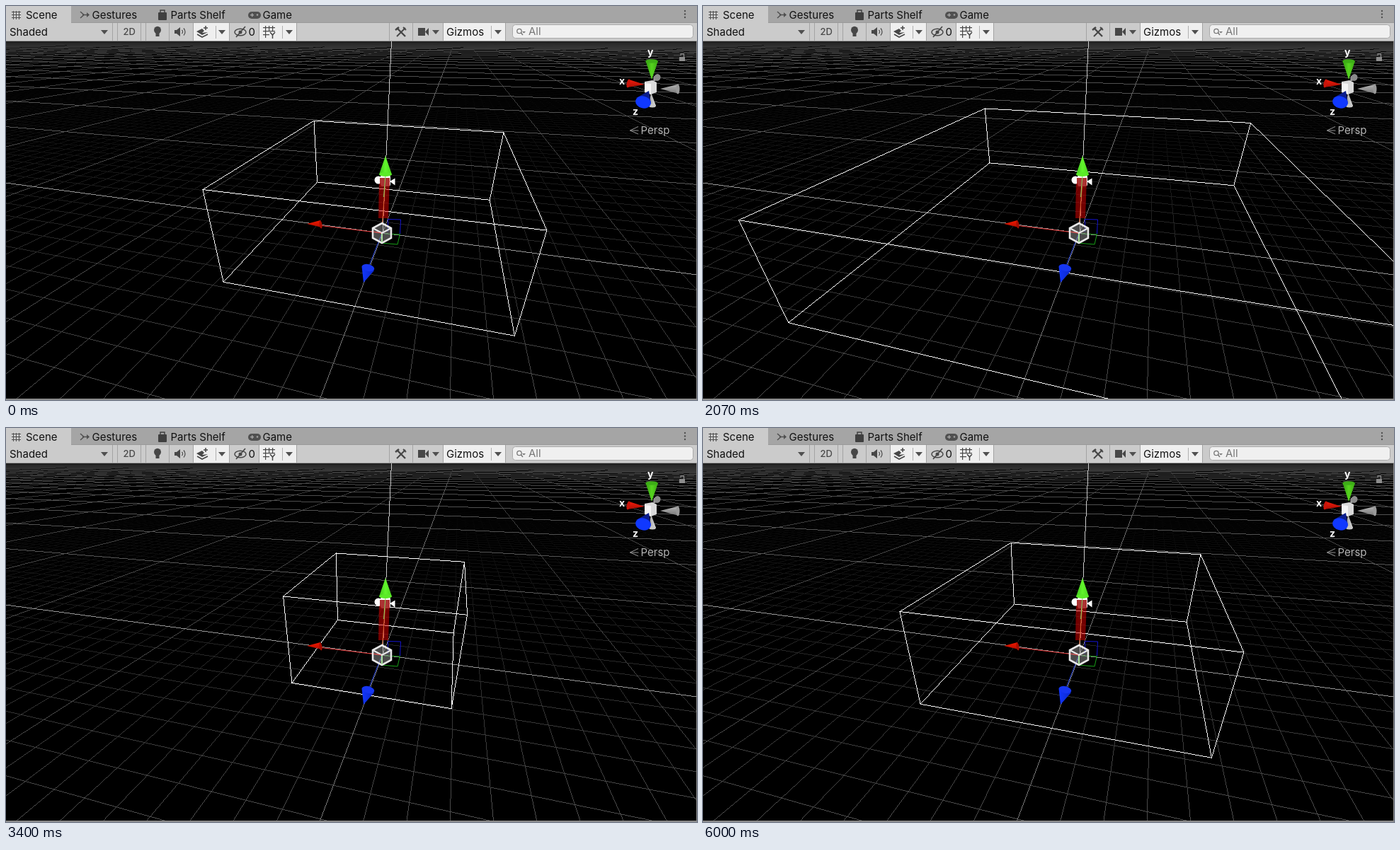
These frames come from a looping animation (976 by 557 pixels, 8000 ms). An HTML page with a canvas:

```html
<!DOCTYPE html>
<html lang="en">
<head>
<meta charset="utf-8">
<title>Scene view</title>
<style>
html, body { margin: 0; width: 100%; height: 100%; overflow: hidden; background: #000; }
canvas { display: block; }
</style>
</head>
<body>
<canvas id="stage" width="976" height="557"></canvas>
<script>
const W = 976, H = 557, TOP = 50, RIGHT = 975, BOTTOM = 555;
const LOOP = 8000, TICKS = 15 / 1000;
const FONT = 'Inter, Roboto, sans-serif';
const BOX_HEIGHT = 3.514;

// [tick, half width of the box in grid units]
const KEYS = [
  [0, 4.754], [14, 4.754], [15, 4.717], [20, 4.717], [23, 4.06], [24, 4.06], [26, 3.815], [27, 3.815],
  [31, 7.485], [33, 8.92], [34, 8.92], [35, 9.385], [36, 9.385], [40, 7.877], [45, 5.77],
  [49, 3.246], [51, 2.954], [53, 2.954], [58, 9.477], [81, 9.477], [82, 4.717], [89, 4.717],
  [90, 4.754], [120, 4.754]
];

const stage = document.getElementById('stage').getContext('2d');
const layer = () => Object.assign(document.createElement('canvas'), { width: W, height: H }).getContext('2d');

// Perspective: one depth step and one vanishing point per axis
const STEP = { x: 0.014938, y: -0.031401, z: -0.056034 };
function project(x, y, z) {
  const a = x * STEP.x, b = y * STEP.y, c = z * STEP.z;
  const w = 1 + a + b + c;
  return {
    x: (531.4 - 1612 * a + 490 * b + 639 * c) / w,
    y: (320.4 + 35 * a + 1212 * b + 35 * c) / w,
    w
  };
}

// Visits each pixel of a hard-edged line, with its depth
function trace(p, q, visit) {
  const axis = Math.abs(q.x - p.x) > Math.abs(q.y - p.y) ? 'x' : 'y';
  if (p[axis] > q[axis]) [p, q] = [q, p];
  const span = q[axis] - p[axis];
  const first = Math.max(0, Math.round(p[axis])), last = Math.min(W, Math.round(q[axis]));
  for (let i = first; i <= last; i++) {
    const t = Math.min(1, Math.max(0, (i - p[axis]) / span));
    const x = Math.round(p.x + (q.x - p.x) * t), y = Math.round(p.y + (q.y - p.y) * t);
    if (x < 0 || x >= RIGHT || y < TOP || y >= BOTTOM) continue;
    visit(x, y, 1 / ((1 - t) / p.w + t / q.w));
  }
}

function drawGrid() {
  const g = layer();
  g.fillStyle = '#000';
  g.fillRect(0, 0, W, H);
  const img = g.getImageData(0, 0, W, H), px = img.data;
  const R = 500, NEAR = 0.7;
  const line = (p, q, shade) => trace(p, q, (x, y, w) => {
    const i = (y * W + x) * 4, v = Math.max(px[i], shade(w));
    px[i] = px[i + 1] = px[i + 2] = v;
  });
  const minor = w => 50 / w - 12;
  for (let i = -R; i <= R; i++) {
    const major = i % 10 === 0;
    if (!major && Math.abs(i) > 70) continue;
    const zNear = Math.min(R, -(NEAR + i * STEP.x) / STEP.z);
    const xNear = Math.max(-R, -(NEAR + i * STEP.z) / STEP.x);
    const zShade = i === 0 ? w => 125 - 6 * w : major ? w => 75 - 4 * w : minor;
    const xShade = i === 0 ? w => 150 : major ? w => 92 - 3.2 * w : minor;
    if (zNear > -R) line(project(i, 0, -R), project(i, 0, zNear), zShade);
    if (xNear < R) line(project(R, 0, i), project(xNear, 0, i), xShade);
  }
  line(project(0, 0, 0), project(0, 8.2, 0), () => 205);
  g.putImageData(img, 0, 0);
  return g.canvas;
}

// Drawing helpers
function poly(g, pts, fill, stroke, width = 1, open = false) {
  g.beginPath();
  for (let i = 0; i < pts.length; i += 2) g.lineTo(pts[i], pts[i + 1]);
  if (!open) g.closePath();
  if (fill) { g.fillStyle = fill; g.fill(); }
  if (stroke) { g.strokeStyle = stroke; g.lineWidth = width; g.stroke(); }
}
function path(g, pts, color, width = 1) { poly(g, pts, null, color, width, true); }
function oval(g, x, y, rx, ry, color, turn = 0) {
  g.beginPath();
  g.ellipse(x, y, rx, ry, turn, 0, 7);
  g.fillStyle = color;
  g.fill();
}
function rect(g, x, y, w, h, color) { g.fillStyle = color; g.fillRect(x, y, w, h); }
function pill(g, x, y, w, h, r, fill, stroke) {
  g.beginPath();
  g.roundRect(x, y, w, h, r);
  g.fillStyle = fill;
  g.fill();
  if (stroke) { g.strokeStyle = stroke; g.lineWidth = 1; g.stroke(); }
}
function text(g, str, x, y, color, size = 15, weight = 400) {
  g.font = `${weight} ${size}px ${FONT}`;
  g.fillStyle = color;
  g.fillText(str, x, y);
}
function shade(g, x0, y0, x1, y1, ...colors) {
  const s = g.createLinearGradient(x0, y0, x1, y1);
  colors.forEach((c, i) => s.addColorStop(i / (colors.length - 1), c));
  return s;
}
const arrow = (g, x, y = 37) => poly(g, [x - 5, y - 3, x + 5, y - 3, x, y + 3], '#505050');

function drawHandles(g) {
  // object at the centre
  poly(g, [527, 243, 542, 243, 540, 300, 526, 300], 'rgba(220,0,0,.52)');
  path(g, [536.5, 240, 531.5, 308], '#d8602c');
  oval(g, 526, 246, 5.5, 5.5, '#fff');
  pill(g, 529, 239, 14, 16, 3, '#fff');
  poly(g, [542, 248, 549.5, 243.5, 549.5, 253.5], '#fff');
  rect(g, 528, 243, 14, 12, 'rgba(150,0,0,.8)');
  path(g, [536, 239, 533.5, 270], '#7fd060');

  path(g, [445, 310.5, 531, 321], '#e03030');
  path(g, [531, 321, 513, 367], '#2a48e0');
  path(g, [539.5, 319, 539.5, 301.5, 557.5, 302, 556.5, 322], '#1414d2');
  path(g, [556.5, 322, 553, 337, 529, 335], '#18a018');
  path(g, [535, 322, 556, 323], '#18a018');

  poly(g, [536, 212, 545, 238, 527, 238], shade(g, 527, 0, 545, 0, '#3fc41c', '#62f52c', '#49d51f'));
  oval(g, 536, 238, 9, 3, '#5bea28');
  poly(g, [425, 308, 444, 303, 446, 313], shade(g, 0, 303, 0, 314, '#f01800', '#b00c00'));
  oval(g, 444.5, 309, 2, 5.5, '#a80d00', -0.15);
  poly(g, [505, 391, 502.5, 368, 520, 374], shade(g, 502, 0, 520, 0, '#1237ff', '#0b27c8'));
  oval(g, 511.5, 370, 9, 4.8, '#1636f2', 0.25);

  poly(g, [531, 307, 544, 314, 544, 328, 531, 335, 518, 328, 518, 314], 'rgba(150,150,150,.5)', '#e8e8e8', 2.6);
  path(g, [518, 314, 531, 321, 544, 314], '#e8e8e8', 2);
  path(g, [531, 321, 531, 335], '#e8e8e8', 2);
  path(g, [519, 319, 530, 321], '#e34c4c');
  path(g, [531, 322, 531, 334], '#6fdc55');
}

function drawCompass(g) {
  poly(g, [914, 107, 915, 99, 924, 103], '#a0a0a0');
  oval(g, 920, 101, 4.5, 5, '#8a8a8a', 0.4);
  poly(g, [911, 122, 918, 141, 908, 142], shade(g, 907, 0, 918, 0, '#999', '#ddd'));
  oval(g, 913, 141, 5, 2.5, '#c8c8c8');
  poly(g, [924, 117, 950, 110.5, 950, 124], shade(g, 0, 110, 0, 124, '#b8b8b8', '#777'));
  oval(g, 949, 117.5, 2.5, 7, '#999');
  poly(g, [902, 107, 913, 105, 919, 108, 919, 122, 911, 125, 902, 122], '#d9d9d9');
  poly(g, [902, 109, 911, 110, 911, 125, 902, 122], '#f4f4f4');
  poly(g, [912, 104, 903.5, 78, 921, 78], shade(g, 903, 0, 921, 0, '#2f9b10', '#57d41f', '#3aa714'));
  oval(g, 912, 78, 8.8, 2.8, '#3eae17');
  poly(g, [902, 111, 880, 104, 878, 115], shade(g, 0, 104, 0, 115, '#f31b0a', '#a90e05'));
  oval(g, 879, 109.5, 2.3, 6, '#c9140a', 0.2);
  poly(g, [908, 120, 911, 138, 890, 130], '#0a1d8c');
  oval(g, 900, 136, 11, 8.5, '#1038ff', 0.2);
  text(g, 'x', 866, 111, '#fff', 14, 700);
  text(g, 'y', 906, 70, '#fff', 14, 700);
  text(g, 'z', 885, 154, '#fff', 14, 700);
  path(g, [893, 170.5, 881.5, 176, 893, 181], '#989898');
  path(g, [881.5, 176, 893.5, 176], '#989898');
  text(g, 'Persp', 896.5, 181, '#b4b4b4');
  rect(g, 951, 72, 8, 6, '#8d8d8d');
  path(g, [953, 70, 953, 68, 957.5, 68, 957.5, 72], '#8d8d8d', 1.3);
}

function drawTabs(g) {
  rect(g, 0, 0, W, 24, '#a5a5a5');
  rect(g, 0, 0, 92, 24, '#cbcbcb');
  const ink = '#111', icon = '#505050';
  for (const d of [0, 4, 8]) {
    rect(g, 10 + d, 7, 1, 12, icon);
    rect(g, 8, 8 + d, 13, 1, icon);
  }
  text(g, 'Scene', 28, 18, ink);
  path(g, [105, 8, 110, 12.5, 105, 17], icon, 1.5);
  path(g, [108, 12.5, 117, 12.5], icon, 1.5);
  poly(g, [114, 9, 118, 12.5, 114, 16], icon);
  text(g, 'Gestures', 121.5, 18, ink);
  pill(g, 215, 9, 12, 11, 1, '#3f3f3f');
  path(g, [218, 10, 218, 6, 224, 6, 224, 10], '#3f3f3f', 1.4);
  text(g, 'Parts Shelf', 232.5, 18, ink);
  pill(g, 342, 8, 18, 10, 5, icon);
  rect(g, 345, 12, 5, 1.4, '#a5a5a5');
  rect(g, 347, 10.2, 1.4, 5, '#a5a5a5');
  oval(g, 355, 12.5, 1.3, 1.3, '#a5a5a5');
  text(g, 'Game', 362.5, 18, ink);
  for (const y of [7, 11.5, 16]) oval(g, 959, y, 1.2, 1.2, icon);
}

function drawToolbar(g) {
  const ink = '#111', icon = '#474747', on = '#efefef';
  rect(g, 0, 24, W, 26, '#cbcbcb');
  rect(g, 92, 23, W - 92, 1, '#999');
  rect(g, 264, 24, 51, 25, on);
  rect(g, 358, 24, 52, 25, on);
  rect(g, 617, 24, 88, 25, on);
  for (const x of [150, 157, 190, 197, 230, 264, 315, 357, 410, 541, 574, 617, 705]) rect(g, x, 24, 1, 25, '#a3a3a3');
  for (const x of [296, 390, 685]) rect(g, x, 28, 1, 18, '#b0b0b0');
  rect(g, 0, 49, W, 1, '#999');

  text(g, 'Shaded', 5, 42, ink);
  text(g, '2D', 165.5, 41, '#4a4a4a', 13, 500);
  for (const x of [139, 305, 400, 607, 695]) arrow(g, x);

  // light, sound
  oval(g, 214, 34, 5, 5.3, icon);
  rect(g, 211.5, 38, 5, 5, icon);
  poly(g, [238, 34, 241, 34, 246, 30, 246, 43, 241, 39, 238, 39], icon);
  g.strokeStyle = icon;
  g.lineWidth = 1.2;
  for (const r of [3.5, 7]) {
    g.beginPath();
    g.arc(246, 36.5, r, -0.8, 0.8);
    g.stroke();
  }
  // effects
  poly(g, [269, 36, 277, 32, 280, 35, 277, 38, 285, 37, 277, 41], icon);
  path(g, [270, 40, 277, 44, 285, 40], icon, 1.6);
  path(g, [282, 28, 282, 34], icon, 1.5);
  path(g, [279, 31, 285, 31], icon, 1.5);
  // hidden objects
  g.beginPath();
  g.ellipse(331, 37, 8, 4.8, 0, 0, 7);
  g.strokeStyle = icon;
  g.lineWidth = 1.5;
  g.stroke();
  oval(g, 331, 37, 2.5, 2.5, icon);
  path(g, [325, 44, 338, 29], icon, 1.7);
  text(g, '0', 342.5, 42, ink);
  // grid
  for (const d of [0, 5, 10]) {
    rect(g, 366 + d, 28, 1.2, d ? 8 : 17, icon);
    rect(g, 363, 30 + d, d === 10 ? 9 : 17, 1.2, icon);
  }
  path(g, [373, 37, 376.5, 41, 380, 37], icon, 1.5);
  path(g, [376.5, 41, 376.5, 46], icon, 1.5);
  // tools, camera
  path(g, [552, 31, 564, 43], icon, 2.4);
  path(g, [564, 31, 552, 43], icon, 2);
  path(g, [550, 34, 555, 30], icon, 2.4);
  path(g, [561, 30, 565, 34], icon, 1.8);
  rect(g, 582, 31, 10, 11, icon);
  poly(g, [592, 36.5, 597, 31, 597, 42], icon);
  text(g, 'Gizmos', 622, 42, ink);

  pill(g, 715.5, 26.5, 255, 19, 4, '#f0f0f0', '#aaa');
  g.beginPath();
  g.arc(725, 35.5, 3.2, 0, 7);
  g.strokeStyle = '#777';
  g.lineWidth = 1.3;
  g.stroke();
  path(g, [727.3, 37.8, 730, 41], '#777', 1.5);
  poly(g, [729, 36, 734, 36, 731.5, 38.5], '#777');
  text(g, 'All', 738, 41, '#777');
}

function drawOverlay() {
  const g = layer();
  drawHandles(g);
  drawCompass(g);
  drawTabs(g);
  drawToolbar(g);
  rect(g, 0, BOTTOM, W, 2, '#8a8a8a');
  rect(g, RIGHT, TOP, 1, H - TOP, '#8a8a8a');
  return g.canvas;
}

function halfWidth(ms) {
  const tick = Math.floor((ms + 3.4) * TICKS);
  const i = Math.max(1, KEYS.findIndex(k => k[0] >= tick));
  const [t0, v0] = KEYS[i - 1], [t1, v1] = KEYS[i];
  return v0 + (v1 - v0) * (tick - t0) / (t1 - t0);
}

function drawBox(s) {
  stage.fillStyle = '#fff';
  const line = (p, q) => trace(p, q, (x, y) => stage.fillRect(x, y, 1, 1));
  const ring = y => [[1, -1], [-1, -1], [-1, 1], [1, 1]].map(([x, z]) => project(x * s, y, z * s));
  const low = ring(0), high = ring(BOX_HEIGHT);
  for (let i = 0; i < 4; i++) {
    const j = (i + 1) % 4;
    line(low[i], low[j]);
    line(high[i], high[j]);
    line(low[i], high[i]);
  }
}

const grid = drawGrid(), overlay = drawOverlay();
const start = performance.now();

function frame(now) {
  stage.drawImage(grid, 0, 0);
  drawBox(halfWidth(Math.max(0, now - start) % LOOP));
  stage.drawImage(overlay, 0, 0);
  requestAnimationFrame(frame);
}
frame(start);
</script>
</body>
</html>
```
